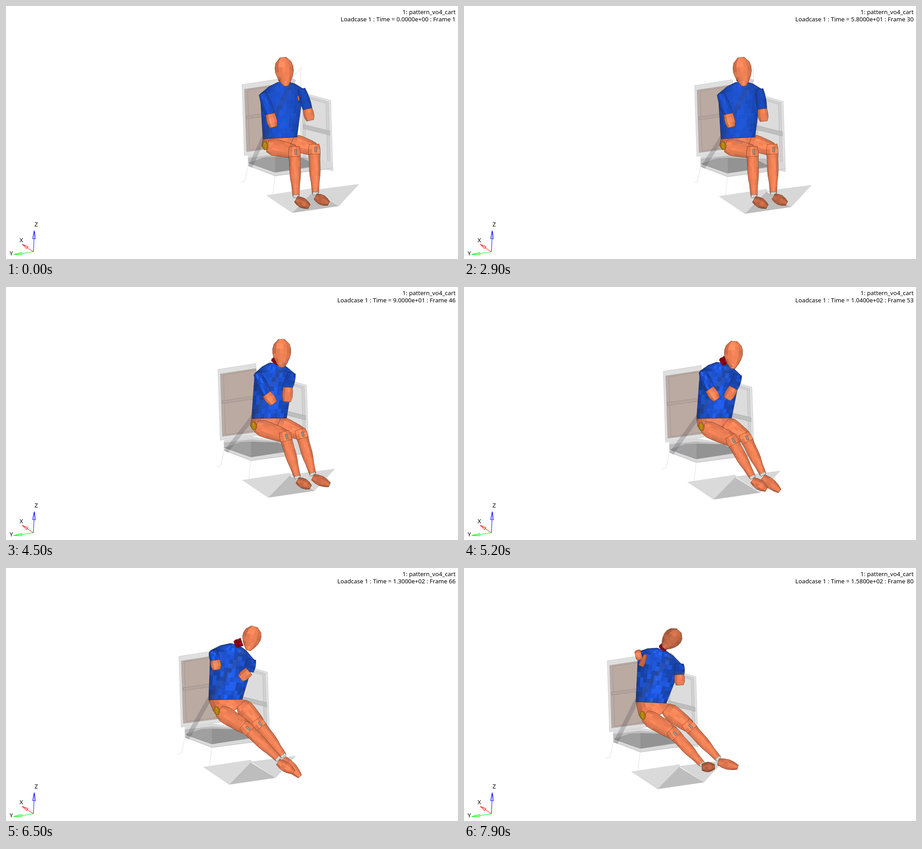
An HTML page with a canvas that plays this animation: 999 by 560 pixels, repeating every 8 s.

```html
<!DOCTYPE html>
<html lang="en">
<head>
<meta charset="utf-8">
<title>Sled test</title>
<style>
  html, body { margin: 0; width: 999px; height: 560px; overflow: hidden; background: #fff; }
  canvas { display: block; }
</style>
</head>
<body>
<canvas id="stage" width="999" height="560"></canvas>
<script>
const ctx = document.getElementById('stage').getContext('2d');
const ORANGE = [243, 130, 86], BLUE = [28, 80, 202], RED = [140, 0, 24], GREY = [150, 150, 146];

// Joint positions in four key poses: seated, leaning, sliding, thrown back
const poseTimes = [2.9, 4.5, 5.9, 7.9];
const legs = {
  hipL: [[578, 310], [553, 308], [499, 313], [400, 327]],
  kneeL: [[637, 311], [614, 320], [552, 341], [456, 358]],
  ankleL: [[641, 421], [644, 421], [623, 420], [526, 434]],
  toeL: [[670, 444], [673, 443], [657, 454], [554, 440]],
  hipR: [[632, 300], [602, 302], [548, 299], [446, 311]],
  kneeR: [[681, 306], [650, 315], [580, 333], [490, 342]],
  ankleR: [[684, 415], [678, 414], [634, 414], [562, 422]],
  toeR: [[713, 437], [715, 438], [669, 465], [605, 441]]
};
const upper = {
  crown: [[612, 114], [609, 116], [574, 126], [475, 139]],
  chin: [[619, 177], [610, 178], [567, 183], [441, 177]],
  collar: [[610, 168], [592, 168], [534, 167], [436, 180]],
  shoulderL: [[567, 194], [555, 191], [486, 183], [390, 187]],
  elbowL: [[584, 239], [576, 237], [494, 211], [392, 191]],
  wristL: [[591, 268], [592, 258], [503, 237], [379, 194]],
  shoulderR: [[653, 184], [632, 190], [572, 198], [477, 212]],
  elbowR: [[659, 228], [623, 222], [563, 226], [476, 236]],
  wristR: [[662, 255], [621, 254], [540, 242], [477, 259]],
  waistL: [[568, 294], [543, 291], [477, 291], [380, 296]],
  waistR: [[643, 290], [620, 290], [553, 289], [447, 299]]
};

const mix = (a, b, f) => a + (b - a) * f;
const mixPt = (a, b, f) => [mix(a[0], b[0], f), mix(a[1], b[1], f)];
const shift = (p, dx, dy) => [p[0] + dx, p[1] + dy];
const rand = (a, b, c) => {
  const v = Math.sin(a * 78.233 + b * 37.719 + c * 12.9898) * 43758.5453;
  return v - Math.floor(v);
};

// The sled gathers speed softly, then slides at a steady rate
const sledAt = t => -35.4 * Math.log(1 + Math.exp((t - 3.55) / .75));

// Smooth curve through the key values that never overshoots them
function track(values, t) {
  const times = poseTimes, last = times.length - 1;
  if (t <= times[0]) return values[0];
  if (t >= times[last]) return values[last];
  const secant = i => (values[i + 1] - values[i]) / (times[i + 1] - times[i]);
  const slope = i => {
    if (i === 0) return 0;
    if (i === last) return secant(last - 1);
    const a = secant(i - 1), b = secant(i);
    return a * b <= 0 ? 0 : 2 * a * b / (a + b);
  };
  let i = 0;
  while (t >= times[i + 1]) i++;
  const h = times[i + 1] - times[i], f = (t - times[i]) / h, g = 1 - f;
  return values[i] * (1 + 2 * f) * g * g + values[i + 1] * f * f * (3 - 2 * f)
    + h * f * g * (slope(i) * g - slope(i + 1) * f);
}
const pose = (joints, t) => Object.fromEntries(Object.entries(joints).map(
  ([name, keys]) => [name, [0, 1].map(k => track(keys.map(p => p[k]), t))]));

function trace(pts) {
  ctx.beginPath();
  pts.forEach(p => ctx.lineTo(p[0], p[1]));
}
function poly(color, ...pts) {
  trace(pts);
  ctx.fillStyle = color;
  ctx.fill();
}
function line(color, width, ...pts) {
  trace(pts);
  ctx.strokeStyle = color;
  ctx.lineWidth = width;
  ctx.stroke();
}

// Faceted surface stretched over cross-sections, each a pair [left, right]
function mesh(ribs, color, { cols = 5, sub = 1, rough = .08, seed = 1, light = 1 } = {}) {
  const rows = (ribs.length - 1) * sub;
  const at = (row, u) => {
    const r = row / sub, i = Math.min(Math.floor(r), ribs.length - 2);
    const side = k => mixPt(ribs[i][k], ribs[i + 1][k], r - i);
    return mixPt(side(0), side(1), u);
  };
  for (let r = 0; r < rows; r++) for (let c = 0; c < cols; c++) {
    const u = (c + .5) / cols;
    const lit = light * (.6 + .44 * Math.sin(Math.PI * (.12 + .72 * u)))
      * (1 + rough * (2 * rand(r, c, seed) ** 2 - .6));
    const fill = `rgb(${color.map(v => Math.min(255, Math.round(v * lit))).join()})`;
    const cell = [at(r, c / cols), at(r, (c + 1) / cols), at(r + 1, (c + 1) / cols), at(r + 1, c / cols)];
    poly(fill, ...cell);
    line(fill, .7, ...cell, cell[0]);
  }
  const edge = [];
  for (let r = 0; r <= rows; r++) edge.push(at(r, 1)), edge.unshift(at(r, 0));
  line('rgba(45,18,8,.5)', .9, ...edge, edge[0]);
}

// Surface around a bone with half widths spread evenly along it
function limb(a, b, widths, color, options) {
  const dx = b[0] - a[0], dy = b[1] - a[1], len = Math.hypot(dx, dy) || 1;
  mesh(widths.map((w, i) => {
    const p = mixPt(a, b, i / (widths.length - 1)), nx = -dy / len * w, ny = dx / len * w;
    return [shift(p, nx, ny), shift(p, -nx, -ny)];
  }), color, options);
}

// Part of a four-cornered panel, given as fractions of its width and height
function patch(color, [a, b, c, d], u0, v0, u1, v1) {
  const at = (u, v) => mixPt(mixPt(a, b, u), mixPt(d, c, u), v);
  const pts = [at(u0, v0), at(u1, v0), at(u1, v1), at(u0, v1)];
  poly(color, ...pts);
  line('rgba(0,0,0,.13)', 1, ...pts, pts[0]);
}

function drawSled() {
  const back = [[522, 174], [606, 161], [612, 320], [527, 331]];
  const side = [[650, 190], [718, 209], [723, 365], [652, 350]];
  // floor plate
  poly('#dadada', [575, 419], [681, 403], [684, 409], [633, 458]);
  poly('#d7d7d7', [681, 407], [781, 394], [736, 443]);
  poly('#bdbdbd', [681, 409], [736, 443], [633, 458]);
  // thin straps
  line('#dedede', 1, [519, 390], [528, 388], [535, 356], [542, 350]);
  line('#e2e2e2', 1, [595, 374], [590, 418]);
  line('#dddddd', 1, [628, 164], [652, 137], [652, 190]);

  patch('#e1e1e1', side, 0, 0, 1, 1);
  patch('#d2d2d2', side, .08, .03, .92, .95);
  patch('#dcdcdc', side, .15, .06, .84, .92);
  patch('#bebebe', side, .1, .44, .94, .5);
  patch('#dfdfdf', back, 0, 0, 1, 1);
  patch('#b9aba5', back, .06, .07, 1, .95);
  patch('#bbaaa2', back, .14, .09, 1, .93);
  patch('#b3a49d', back, .08, .45, 1, .49);
  // seat base
  poly('#d9d9d9', [535, 331], [595, 322], [722, 345], [722, 360], [595, 376], [535, 353]);
  poly('#bdbdbd', [535, 336], [595, 329], [690, 337], [690, 350], [595, 366], [536, 347]);
  poly('#a0a0a0', [536, 347], [572, 335], [595, 334], [595, 368]);
  poly('#939393', [595, 334], [655, 336], [688, 353], [595, 368]);
  line('#8c8c8c', 1, [536, 347], [595, 368], [688, 354]);
  line('#bbbbbb', 1, [535, 353], [595, 376], [722, 359]);
}

function drawLeg(hip, knee, ankle, toe, footLight, seed) {
  const shin = f => mixPt(knee, ankle, f);
  limb(hip, shin(.1), [13, 18, 18, 17, 16, 14], ORANGE, { cols: 6, seed });
  limb(shin(.06), ankle, [12, 13, 12, 12, 12, 11, 9, 8, 7], ORANGE, { seed: seed + 1, rough: .05 });
  limb(shin(0), shin(.2), [11, 13, 13], ORANGE, { cols: 3, light: 1.05, seed: seed + 2 });
  limb(shift(shin(.06), 3, 0), shift(shin(.16), 3, 0), [2, 2], GREY, { cols: 2 });
  limb(shin(.97), shin(1.03), [6, 6], [205, 205, 200], { cols: 2 });
  limb(shift(ankle, 0, 7), toe, [7, 10, 11, 9, 5], ORANGE, { cols: 4, light: footLight, seed: seed + 3 });
}

// Neck opening, shoulders and waist span the shirt
function torsoRibs(U) {
  const dx = U.shoulderR[0] - U.shoulderL[0], dy = U.shoulderR[1] - U.shoulderL[1];
  const len = Math.hypot(dx, dy);
  const out = (p, d) => shift(p, dx / len * d, dy / len * d);
  const neck = [out(U.collar, -10), out(U.collar, 10)];
  const top = [out(U.shoulderL, -5), out(U.shoulderR, 4)];
  const waist = [U.waistL, U.waistR];
  const slope = [0, 1].map(k => shift(mixPt(neck[k], top[k], .5), 0, -3));
  const flank = f => [0, 1].map(k => mixPt(top[k], waist[k], f));
  return [neck, slope, ...[0, .2, .4, .6, .8, 1].map(flank)];
}

function drawBody(t, sledX) {
  const at = values => track(values, t);
  const L = pose(legs, t), U = pose(upper, t);
  const rough = at([.06, .17, .2, .2]);
  // the right arm stays put until the sled has come this far
  const reach = Math.max(0, 13 + sledX);
  U.elbowR = shift(U.elbowR, reach * .6, 0);
  U.wristR = shift(U.wristR, reach * .8, -reach * .15);

  mesh([
    [U.waistL, U.waistR],
    [shift(L.hipL, -13, 0), shift(L.hipR, 15, -4)],
    [shift(mixPt(L.hipL, L.hipR, .2), 0, 15), shift(mixPt(L.hipL, L.hipR, .8), 0, 8)]
  ], ORANGE, { cols: 7, sub: 2, seed: 4 });
  drawLeg(L.hipR, L.kneeR, L.ankleR, L.toeR, at([.78, .85, 1, .92]), 11);
  drawLeg(L.hipL, L.kneeL, L.ankleL, L.toeL, at([.78, .82, 1, .74]), 21);
  limb(shift(L.hipL, -6, -9), shift(L.hipL, -4, 8), [3, 6, 6, 3], [185, 135, 18], { cols: 3 });

  mesh(torsoRibs(U), BLUE, { cols: 11, sub: 2, rough, seed: 7 });
  limb(shift(U.shoulderR, -4, 10), shift(U.shoulderR, -5, 25), [1, 4, 2], ORANGE, { cols: 2 });

  limb(U.collar, mixPt(U.collar, mixPt(U.crown, U.chin, .5), .42), [7, 9, 8, 9], RED,
    { cols: 4, sub: 2, rough: .25 });
  limb(U.crown, U.chin, [7, 17, 20, 20, 17, 12, 5], ORANGE, { light: at([1, 1, 1.02, .82]), seed: 3 });

  // belt shows through as a translucent band
  line('rgba(70,70,75,.24)', 10, shift(U.shoulderR, -16, -22), U.waistL, [540 + sledX, 356 - sledX * .153]);

  const stub = at([0, 0, 0, 6]);
  if (stub > 1) limb(shift(U.shoulderL, 12, 5), shift(U.shoulderL, 1, 30), [stub * .6, stub, stub],
    ORANGE, { cols: 3, light: .8 });
  const sleeve = [8, 10, 11, 11, 10], hand = [10, 11, 11, 8];
  limb(U.shoulderR, U.elbowR, sleeve, BLUE, { cols: 4, rough, light: .92, seed: 31 });
  limb(U.elbowR, U.wristR, hand, ORANGE, { cols: 4, seed: 32 });
  limb(U.shoulderL, U.elbowL, sleeve, BLUE, { cols: 4, rough, seed: 33 });
  limb(U.elbowL, U.wristL, hand, ORANGE, { cols: 4, seed: 34 });
}

function drawAxis(color, tip, base, half, name, x, y) {
  line(color, 1, [60.5, 544], base);
  const dx = tip[0] - base[0], dy = tip[1] - base[1], len = Math.hypot(dx, dy);
  const side = s => shift(base, -dy / len * half * s, dx / len * half * s);
  line(color, 1, tip, side(1), side(-1), tip, base);
  ctx.fillText(name, x, y);
}

function drawLabels(frame) {
  ctx.font = '13.08px "Noto Sans", "Open Sans", sans-serif';
  ctx.fillStyle = '#000';
  ctx.textAlign = 'right';
  const time = (frame * 2).toExponential(4).replace(/\+(\d)$/, '+0$1');
  ctx.fillText('1: pattern_vo4_cart', 993.7, 18);
  ctx.fillText(`Loadcase 1 : Time = ${time} : Frame ${frame + 1}`, 993.7, 34);
  ctx.textAlign = 'left';
  drawAxis('#00f', [62.5, 497], [62, 515], 3.5, 'Z', 63, 488);
  drawAxis('#f00', [36, 527.5], [47, 535], 3, 'X', 30, 523);
  drawAxis('#0f0', [17, 550], [35, 548], 3, 'Y', 8, 552);
}

function draw(now) {
  const frame = Math.floor(now / 100) % 80, t = frame / 10, sledX = sledAt(t);
  ctx.fillStyle = '#fff';
  ctx.fillRect(0, 0, 999, 560);
  ctx.lineJoin = 'round';
  ctx.save();
  ctx.translate(sledX, -sledX * .153);
  drawSled();
  ctx.restore();
  drawBody(t, sledX);
  drawLabels(frame);
}

const start = performance.now();
function tick() {
  draw(performance.now() - start);
  requestAnimationFrame(tick);
}
tick();
</script>
</body>
</html>
```
